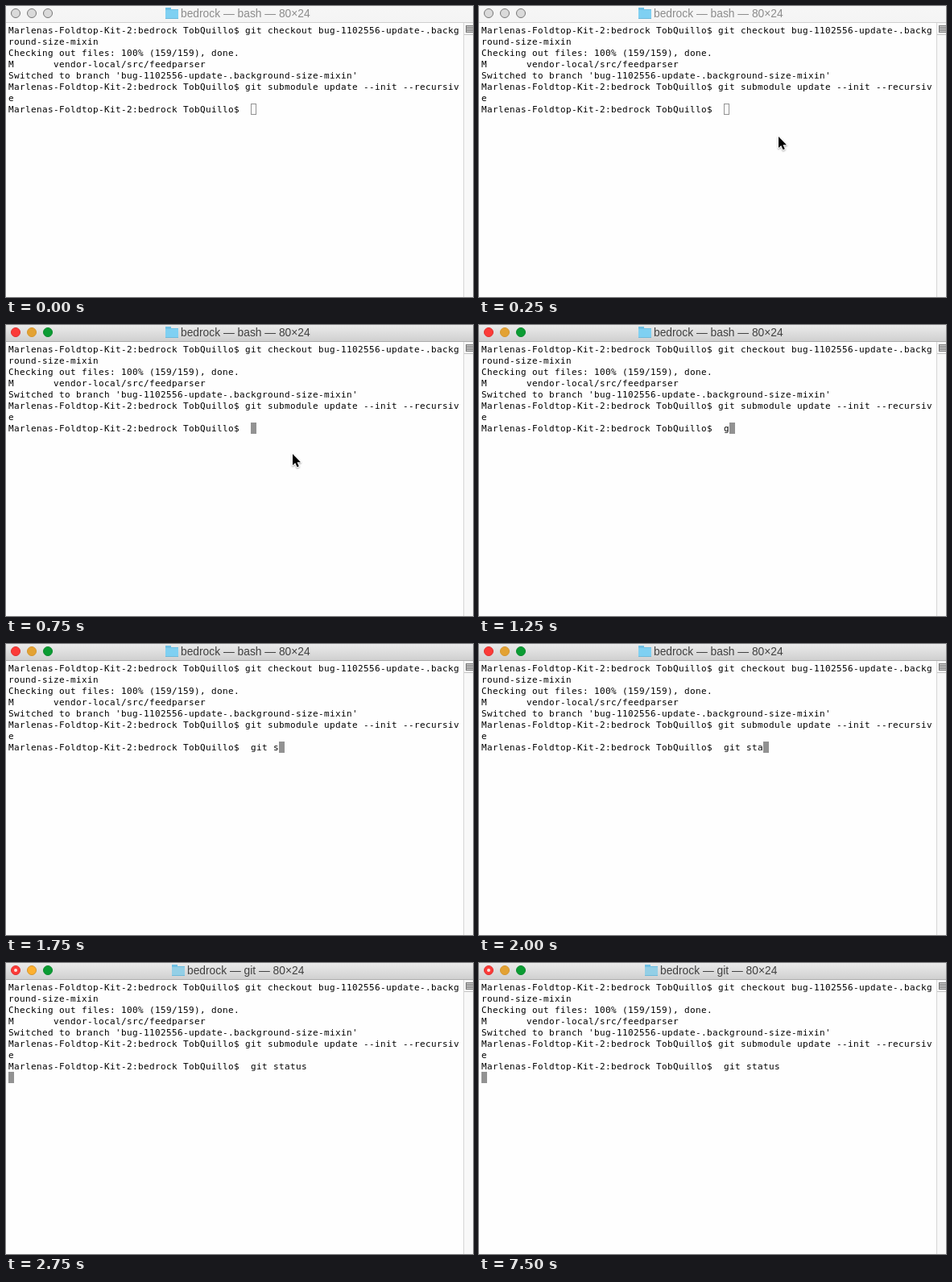
Animation, 580 px wide and 361 px high, one loop 8000 ms. Source, as an HTML page with a canvas:

```html
<!DOCTYPE html>
<html lang="en">
<head>
<meta charset="utf-8">
<title>Terminal</title>
<style>
  html, body { margin: 0; width: 100%; height: 100%; overflow: hidden; background: #fefefe; }
  canvas { display: block; }
</style>
</head>
<body>
<canvas id="stage" width="580" height="361"></canvas>
<script>
const ctx = document.getElementById('stage').getContext('2d');
const LOOP = 8000, STEP = 250;
const ACTIVE = 750, TYPING = 1000, ENTER = 2750, SETTLED = 7500;
const CELL = 7, LINE = 14, LEFT = 3, TOP = 23;

const PROMPT = 'Marlenas-Foldtop-Kit-2:bedrock TobQuillo$ ';
const COMMAND = 'git status';
const HISTORY = [
  PROMPT + 'git checkout bug-1102556-update-.backg',
  'round-size-mixin',
  'Checking out files: 100% (159/159), done.',
  'M       vendor-local/src/feedparser',
  "Switched to branch 'bug-1102556-update-.background-size-mixin'",
  PROMPT + 'git submodule update --init --recursiv',
  'e'
];
// Pointer tip for each step; it is hidden in all other steps.
const POINTER = { 1: [372, 162], 2: [356, 175], 3: [356, 160] };
const ARROW = new Path2D('M0 0V14L3.2 11L5.6 16.3L7.8 15.3L5.5 10.2H10Z');

function box(x, y, w, h, color) {
  ctx.fillStyle = color;
  ctx.fillRect(x, y, w, h);
}

function disc(x, y, r, fill, edge) {
  ctx.beginPath();
  ctx.arc(x, y, r, 0, 2 * Math.PI);
  ctx.fillStyle = fill;
  ctx.fill();
  if (!edge) return;
  ctx.strokeStyle = edge;
  ctx.stroke();
}

function drawTitleBar(active, running, t) {
  const shade = ctx.createLinearGradient(0, 0, 0, 20);
  shade.addColorStop(0, active ? '#ebebeb' : '#f6f6f6');
  shade.addColorStop(1, active ? '#d0d0d0' : '#f4f4f4');
  box(0, 0, 580, 20, shade);
  box(0, 20, 580, 1, active ? '#adadad' : '#cfcfcf');

  const yellow = running && t < SETTLED ? '#fdb02f' : '#e3a234';
  const lights = active
    ? [['#fc3b38', '#e0302e'], [yellow, '#d6952c'], ['#0b9c33', '#0a8a2d']]
    : Array(3).fill(['#dadada', '#777']);
  lights.forEach(([fill, edge], i) => disc(12 + 20 * i, 9, 5.5, fill, edge));
  if (running) disc(12, 9, 2, '#fbe4e0');

  const x = running ? 206 : 198;
  box(x, 2, 7, 3, '#6fc0e4');
  box(x, 4, 16, 12, running ? '#93cfe6' : '#7fd0f2');
  box(x, 4, 16, 1, '#6fc0e4');
  box(x, 15, 16, 1, '#6fb9d9');
  ctx.font = '13.8px "Liberation Sans", Arial, sans-serif';
  ctx.fillStyle = active ? '#404040' : '#8c8c8c';
  ctx.fillText(`bedrock — ${running ? 'git' : 'bash'} — 80×24`, x + 19, 14);
}

function drawScrollBar() {
  box(568, 21, 12, 340, '#f8f8f8');
  box(568, 21, 1, 340, '#d6d6d6');
  box(571, 24, 9, 9, '#777');
  for (const y of [25, 27, 29, 31]) box(572, y, 8, 1, '#d8d8d8');
  box(569, 35, 11, 1, '#c4c4c4');
}

function drawLine(text, row) {
  [...text].forEach((ch, col) => ctx.fillText(ch, LEFT + CELL * col, TOP + 11 + LINE * row));
}

function drawCursor(col, row, solid) {
  const x = LEFT + CELL * col, y = TOP + LINE * row;
  if (solid) return box(x, y, CELL, LINE, '#929292');
  ctx.strokeStyle = '#929292';
  ctx.strokeRect(x + .5, y + .5, CELL - 1, LINE - 1);
}

function drawPointer([x, y]) {
  ctx.save();
  ctx.translate(x, y);
  ctx.lineJoin = 'round';
  ctx.lineWidth = 2;
  ctx.strokeStyle = '#fff';
  ctx.shadowColor = 'rgba(0,0,0,.35)';
  ctx.shadowBlur = 2;
  ctx.shadowOffsetY = 1;
  ctx.stroke(ARROW);
  ctx.shadowColor = 'transparent';
  ctx.fillStyle = '#000';
  ctx.fill(ARROW);
  ctx.restore();
}

function draw(t) {
  const active = t >= ACTIVE, running = t >= ENTER;
  const typed = Math.max(0, Math.min(COMMAND.length, 2 * Math.floor((t - TYPING) / STEP) - 1));
  const input = PROMPT + ' ' + COMMAND.slice(0, typed);
  const row = HISTORY.length;

  box(0, 0, 580, 361, '#fefefe');
  drawTitleBar(active, running, t);
  drawScrollBar();
  ctx.font = '11px "DejaVu Sans Mono", monospace';
  ctx.fillStyle = '#000';
  [...HISTORY, input].forEach(drawLine);
  drawCursor(running ? 0 : input.length, running ? row + 1 : row, active);

  const tip = POINTER[Math.floor(t / STEP)];
  if (tip) drawPointer(tip);
}

function tick() {
  draw(performance.now() % LOOP);
  requestAnimationFrame(tick);
}
tick();
</script>
</body>
</html>
```
